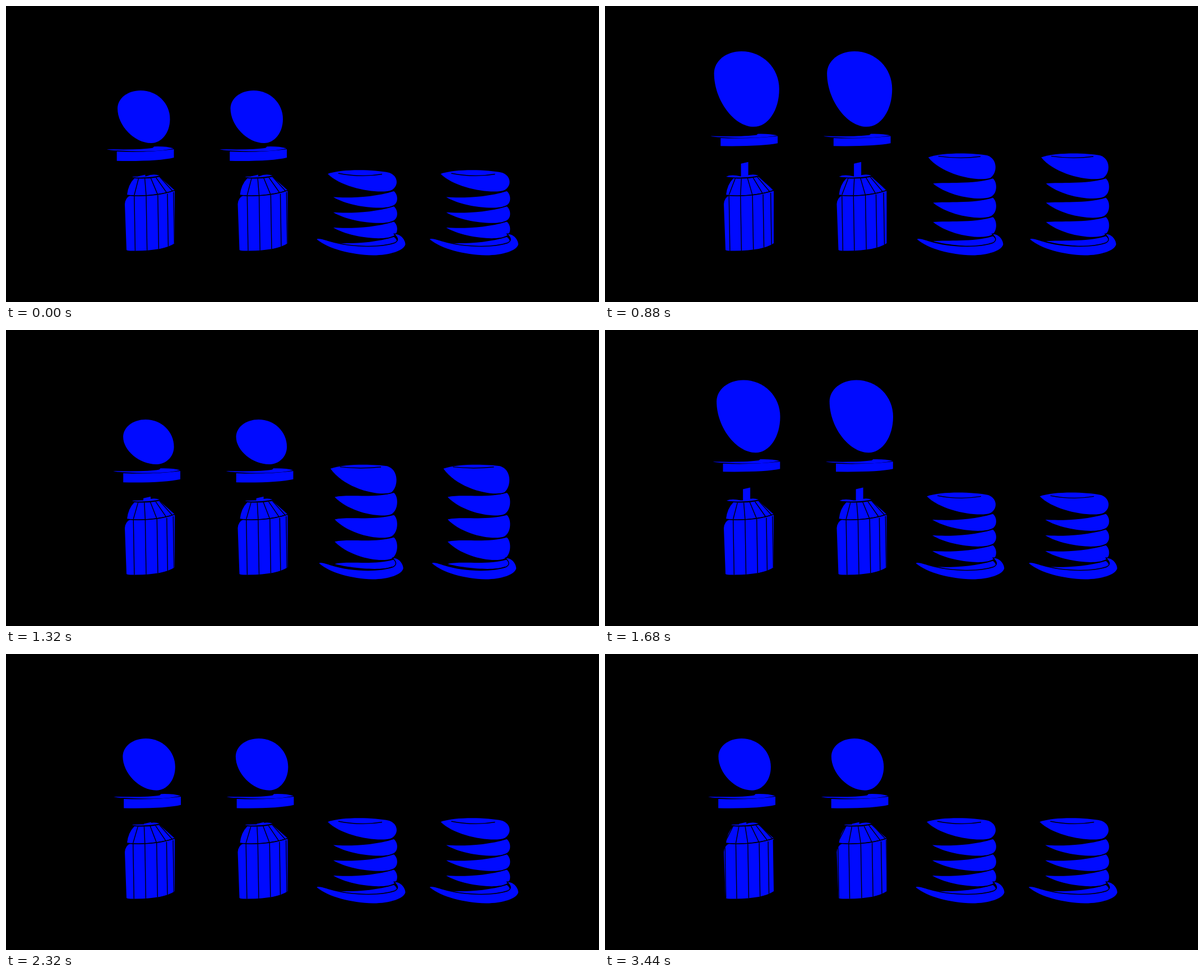
Animation of 1058x529 px, one loop 3480 ms. Source, as an HTML page with a canvas:

```html
<!DOCTYPE html>
<html lang="en">
<head>
<meta charset="utf-8">
<title>Bounce</title>
<style>
  html, body { margin: 0; width: 100%; height: 100%; overflow: hidden; background: #000; }
  canvas { display: block; }
</style>
</head>
<body>
<canvas id="stage" width="1058" height="529"></canvas>
<script>
const ctx = document.getElementById('stage').getContext('2d');
const BLUE = '#000aff', LOOP = 3480, GAP = 201.5;
const SPIN = 0.001167, FACET = Math.PI / 8;

// Keys of [ms, value], joined by sine easing
const bounce = [[640, 0], [980, 1.28], [1273, -.23], [1567, 1.28], [1880, 0]];
const stretch = [[560, 0], [1200, 1.11], [1760, 0]];

const discTop = new Path2D('M179.5 256 Q240 257.5 262 253.5 L264 251.2 Q286 250.5 299 254.5 C275 260.5 240 260.5 198 258.2 Q185 257.8 179.5 256Z');
const discSide = new Path2D('M197.7 260 Q250 262.5 299.5 256 V271 Q270 278 197.7 276.8Z');
const shoulder = new Path2D('M229 308 Q252 310 274 305.5 L300.5 329 C275 338 240 340 216 337.5 Q218 319 229 308Z');
const barrel = new Path2D('M222 338.7 C245 340.5 278 338 301 330 V424 Q282 437 232 437.5 Q217 438 215 436 L212 354 Q213 342 222 338.7Z');
const seam = new Path2D('M216 338.3 C240 341 275 338.5 301 329.5');
const brim = new Path2D('M554.5 417 C557 414 568 418 578 421 C610 431 665 434 694 424 C703 419 699 413 694 408 C704 407 712.5 418 712.5 426 C710 437 685 445.5 655 445.5 C615 444.5 575 434 554.5 417Z');

function at(keys, t) {
  const i = keys.findIndex(k => k[0] > t);
  if (i < 1) return 0;
  const [t0, a] = keys[i - 1], [t1, b] = keys[i];
  return a + (b - a) * (1 - Math.cos(Math.PI * (t - t0) / (t1 - t0))) / 2;
}

function line(path, width) {
  ctx.lineWidth = width;
  ctx.stroke(path);
}

// Blue shape with a black rim around it
function rimmed(path) {
  line(path, 3);
  ctx.fill(path);
}

function placed(x, y, sx, sy, draw) {
  ctx.save();
  ctx.translate(x, y);
  ctx.scale(sx, sy);
  draw();
  ctx.restore();
}

function ribbed(shape, ribs) {
  ctx.save();
  ctx.fill(shape);
  ctx.clip(shape);
  line(ribs, 1.4);
  ctx.restore();
}

// Closed curve through its top, right, bottom and left extremes
function egg(pts) {
  const path = new Path2D();
  path.moveTo(...pts[0]);
  pts.forEach(([x, y], i) => {
    const [ex, ey] = pts[(i + 1) % 4], k = i === 2 ? .5 : .56, flat = i % 2 === 0;
    path.bezierCurveTo(
      flat ? x + (ex - x) * k : x, flat ? y : y + (ey - y) * k,
      flat ? ex : ex + (x - ex) * k, flat ? ey + (y - ey) * k : ey, ex, ey);
  });
  return path;
}

function drawCan(t, u, dx, lift) {
  const first = (.0546 + t * SPIN) % FACET;
  const upper = new Path2D(), lower = new Path2D();
  for (let a = first - 3 * FACET; a < 1.65; a += FACET) {
    const s = Math.sin(a), c = Math.cos(a), x = 247 + 55 * s, y = 329.5 + 9 * c;
    upper.moveTo(246 + 27.5 * s, 301 + 6 * c);
    upper.lineTo(x, y);
    lower.moveTo(x, y);
    lower.lineTo(x + 1.7, 440);
  }
  ribbed(barrel, lower);
  ribbed(shoulder, upper);
  line(seam, 1.4);

  const up = Math.min(1, Math.max(0, u)), left = 225 - 9 * up;
  ctx.fill(new Path2D(`M${left} 305 Q${left + 9} ${304.5 - 4 * up} 242 304.5 H250
    Q262 299 274 303 Q262 306 246 306.3 Q228 307 ${left} 305Z`));
  const x = 235.5 + .83 * dx, top = 302 - 21 * lift;
  ctx.fill(new Path2D(`M${x} ${top + 2.5} L${x + 13} ${top - .5} V304.5 L${x} 305Z`));
}

function drawFigure(t) {
  const u = at(bounce, t), lift = Math.abs(u) + .05 * Math.min(1, t / 600);
  const dx = 13.1 * Math.sin(Math.PI * t / 3870), hx = .75 * dx;
  ctx.fill(egg([
    [hx + 240 - 3 * u, 151 - 68 * u],
    [hx + 292.5 + 11.5 * u, 202 - 52 * u],
    [hx + 259, 245 - 27 * lift],
    [hx + 199 - 10.5 * u, 183 - 61 * u]]));
  placed(dx, 251 - 21 * lift, 1, 1 - .137 * lift, () => {
    ctx.translate(0, -251);
    ctx.fill(discTop);
    ctx.fill(discSide);
  });
  drawCan(t, u, dx, lift);
}

// One turn: tip at x, y; depth d; upper edge bent by a and b, ending at ex, y + ey
function turn(x, y, d, a, b, ex, ey) {
  rimmed(new Path2D(`M${x} ${y} C${x + 26} ${y + a} 655 ${y + b} ${ex} ${y + ey}
    C700 ${y + ey + 6} 701 ${y + .65 * d} 688 ${y + d - 4}
    C668 ${y + d + 4} ${x + 26} ${y + .8 * d} ${x} ${y}Z`));
}

function drawSpring(t) {
  const s = at(stretch, t);
  for (let n = 0; n < 4; n++) {
    const y = 423.3 - 5.3 * s - n * (27.3 + 12.7 * s);
    turn(584 + 2.5 * s, y, n ? 20 + 14.5 * s : 9, 2 - 8 * s, 1 + 2 * s, 692, 3 * s - 10.5);
  }
  const y = 300 - 53 * s;
  turn(574 + 5 * s, y, 33 + 13.5 * s, -9, -8, 684 - 4 * s, -2 - 2.5 * s);
  line(new Path2D(`M${593 + 3 * s} ${y - 1 - 2 * s} Q633 ${y + 7 - 6 * s} ${671 - 2 * s} ${y + .5 - 3.5 * s}`), 1.3);
  placed(637, 0, 1 - .05 * s, 1, () => {
    ctx.translate(-637, 0);
    rimmed(brim);
  });
}

function frame() {
  const t = performance.now() % LOOP;
  ctx.fillStyle = '#000';
  ctx.fillRect(0, 0, 1058, 529);
  ctx.fillStyle = BLUE;
  ctx.strokeStyle = '#000';
  for (const x of [0, GAP]) placed(x, 0, 1, 1, () => { drawFigure(t); drawSpring(t); });
  requestAnimationFrame(frame);
}
frame();
</script>
</body>
</html>
```
